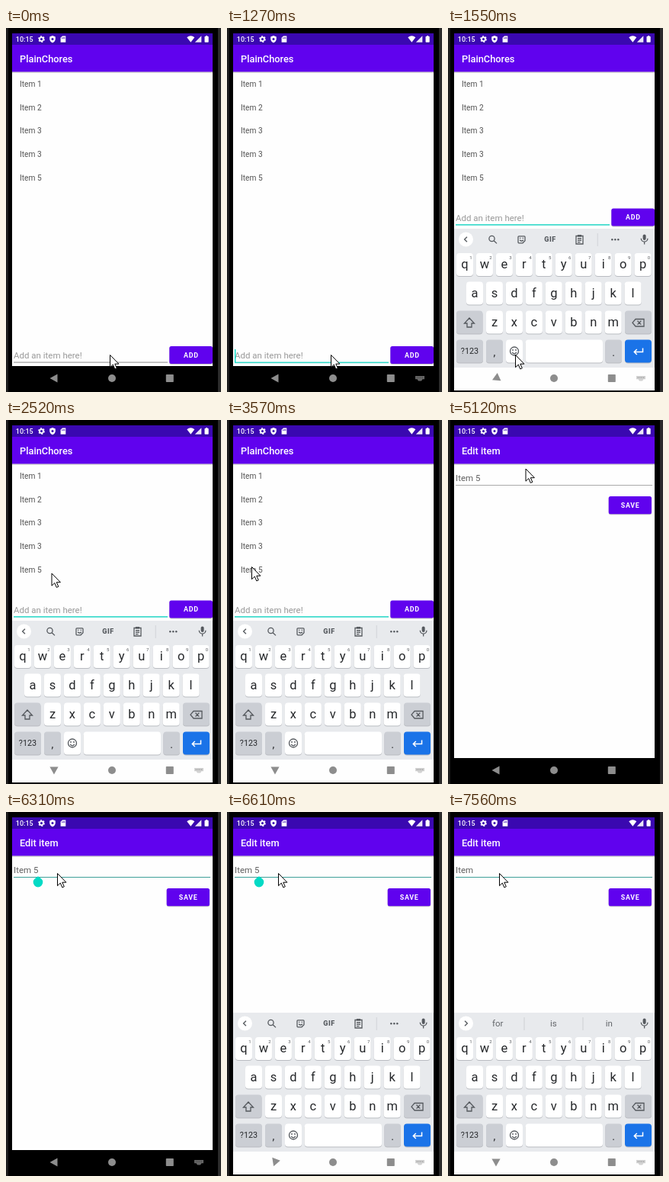
Write an HTML page that moves like this. It is 282 by 477 pixels and loops after 8000 ms.

```html
<!DOCTYPE html>
<html lang="en">
<head>
<meta charset="utf-8">
<title>To-do app</title>
<style>
html, body { margin: 0; width: 100%; height: 100%; overflow: hidden; background: #000; }
svg { display: block; width: 282px; height: 477px; font-family: Roboto, "Open Sans", sans-serif; }
.title { font-size: 12.8px; font-weight: 500; fill: #fff; }
.btn { font-size: 8.9px; font-weight: 700; letter-spacing: .75px; fill: #fff; text-anchor: middle; }
.field { font-size: 11.5px; }
.key { font-size: 16.5px; fill: #26282b; text-anchor: middle; }
.sup { font-size: 6px; fill: #55585c; text-anchor: middle; }
.sug { font-size: 11.5px; fill: #63666a; text-anchor: middle; }
.ico { fill: none; stroke: #55595e; stroke-width: 1.3; }
</style>
</head>
<body>
<svg id="stage" viewBox="0 0 282 477"></svg>
<script>
const LOOP = 8000;
const PURPLE = '#6002ee', DARK = '#3a08b0', TEAL = '#03dac5', GREY = '#cbced4';

const rect = (x, y, w, h, fill, more = '') =>
  `<rect x="${x}" y="${y}" width="${w}" height="${h}" fill="${fill}" ${more}/>`;
const text = (x, y, cls, s, more = '') =>
  `<text x="${x}" y="${y}" class="${cls}" xml:space="preserve" ${more}>${s}</text>`;
const path = (d, more = '') => `<path d="${d}" ${more}/>`;
const disc = (x, y, r, more = '') => `<circle cx="${x}" cy="${y}" r="${r}" ${more}/>`;

const page = title =>
  rect(8, 7, 263, 468, '#000') + rect(8, 7, 263, 15, DARK) +
  rect(8, 57, 263, 386, '#fefefe') + rect(8, 57, 263, 1.8, '#000', 'opacity=".18"') +
  rect(8, 22, 263, 35.4, PURPLE) + text(18, 45, 'title', title);

const button = (x, y, w, h, label) =>
  rect(x, y + 1, w, h, '#000', 'rx="2.5" opacity=".22"') +
  rect(x, y, w, h, PURPLE, 'rx="2.5"') +
  text(x + w / 2 + .3, y + h / 2 + 3.3, 'btn', label);

function listPage() {
  const items = [1, 2, 3, 3, 5].map((n, i) =>
    text(18, 76.8 + i * 30.8, '', 'Item ' + n, 'font-size="10.2" fill="#555"')).join('');
  return page('PlainChores') + items + `<g id="entry">
    ${text(10, 433.1, 'field', 'Add an item here!', 'fill="#999"')}
    ${rect(10, 437.6, 202, 1, '#8b8b8b', 'id="line"')}
    ${rect(10, 421, 1.4, 17, TEAL, 'id="caret"')}
    ${button(214.3, 417, 56.7, 23, 'ADD')}</g>`;
}

function editPage() {
  return page('Edit item') +
    text(10, 80, 'field', '', 'id="value" fill="#606060"') +
    rect(10, 85, 258, 1, '#aaa', 'id="line2"') +
    rect(0, 67, 1.4, 16, TEAL, 'id="caret2"') +
    path('M42 84.3 L46.4 87.6 A6.3 6.3 0 1 1 37.6 87.6 Z', `id="handle" fill="${TEAL}"`) +
    button(210.7, 100, 56.3, 23.3, 'SAVE');
}

function keyboard() {
  const key = (x, y, w, fill = '#fff') =>
    rect(x, y + 1, w, 30, '#b9bcc1', 'rx="4"') + rect(x, y, w, 30, fill, 'rx="4"');
  const row = (letters, x, y) => [...letters].map((c, i) =>
    key(x - 11 + i * 25.95, y, 22) + text(x + i * 25.95, y + 20, 'key', c)).join('');
  let s = rect(8, 263, 263, 182, '#e8eaed') + rect(8, 445, 263, 40, '#fefefe');

  s += disc(23.5, 277, 9.5, 'fill="#fff"') + path('', 'id="chev" class="ico"');
  s += `<g id="tools">` +
    disc(57.5, 276, 3.6, 'class="ico"') + path('M60.2 278.7 L64 282.4', 'class="ico"') +
    path('M93 272.8 H100 Q101 272.8 101 273.8 V278.8 L98 281.8 H93 Q92 281.8 92 280.8 V273.8 Q92 272.8 93 272.8 Z M94.2 277.8 Q96.5 280.4 98.8 277.8 M94.7 274.8 V276 M98.3 274.8 V276', 'class="ico"') +
    text(134, 280.3, '', 'GIF', 'font-size="9" font-weight="900" letter-spacing=".5" fill="#55595e" text-anchor="middle"') +
    path('M168 272.5 H177 V283 H168 Z M170 276 H175 M170 278.3 H175 M170 280.6 H173.5', 'class="ico"') +
    rect(170, 271, 5, 2.6, '#55595e') + rect(195.7, 269, 1, 17, '#d0d3d7') +
    [215.3, 219.3, 223.3].map(x => disc(x, 277.3, 1.2, 'fill="#55595e"')).join('') + '</g>';
  s += `<g id="words">` + ['for', 'is', 'in'].map((w, i) =>
    text(65.3 + i * 73, 281.3, 'sug', w)).join('') +
    rect(99.5, 269, 1, 17, '#cdd0d4') + rect(176.5, 269, 1, 17, '#cdd0d4') + '</g>';
  s += rect(255.6, 270.5, 4, 7.6, '#55595e', 'rx="2"') +
    path('M253.3 275.8 A4.3 4.3 0 0 0 261.9 275.8 M257.6 280 V283.5', 'class="ico"');

  s += row('qwertyuiop', 22, 295);
  for (let i = 0; i < 10; i++) s += text(30 + i * 25.95, 302.5, 'sup', (i + 1) % 10);
  s += row('asdfghjkl', 35, 332.6) + row('zxcvbnm', 61, 370.6);
  s += key(11, 370.6, 34.5, GREY) + key(232, 370.6, 35, GREY);
  s += path('M28 380 L34.5 387 H31 V392 H25 V387 H21.5 Z', 'class="ico"');
  s += path('M246 381.5 H257 V391 H246 L242 386.2 Z M248.5 383.8 L253.3 388.6 M253.3 383.8 L248.5 388.6', 'class="ico"');
  s += key(11, 408.6, 35, GREY) + key(50, 408.6, 22, GREY) + key(76, 408.6, 22) +
    key(101.7, 408.6, 101.3) + key(206.3, 408.6, 21.7, GREY) + key(232, 408.6, 35, '#1a73e8');
  s += text(28.5, 427.4, 'key', '?123', 'style="font-size:10.8px"') +
    text(61, 430, 'key', ',', 'style="font-size:14px"') +
    text(217, 430, 'key', '.', 'style="font-size:14px"');
  s += disc(87, 423.5, 5.5, 'class="ico"') + path('M84.2 425 Q87 428.6 89.8 425', 'class="ico"') +
    disc(85, 422, .9, 'fill="#55595e"') + disc(89, 422, .9, 'fill="#55595e"');
  s += path('M255.5 419.5 V424.5 H244.5 M247.8 421 L244.3 424.5 L247.8 428', 'fill="none" stroke="#fff" stroke-width="1.5"');
  return s;
}

function statusIcons() {
  return `<g fill="#fff">` +
    text(12.8, 17.9, '', '10:15', 'font-size="9" font-weight="500"') +
    disc(46.5, 14.6, 2.5, 'fill="none" stroke="#fff" stroke-width="1.8"') +
    disc(46.5, 14.6, 3.8, 'fill="none" stroke="#fff" stroke-width="1.2" stroke-dasharray="2 1.98"') +
    path('M61 10 L64.8 11.5 V14.5 Q64.5 18 61 19.4 Q57.5 18 57.2 14.5 V11.5 Z') +
    disc(61, 14.4, 1.5, `fill="${DARK}"`) +
    path('M74 10.4 H78.3 V18.8 H71.6 V12.8 Z') +
    path('M73.6 12.5 V14.2 M75.2 12 V14.2 M76.8 12 V14.2', `stroke="${DARK}" stroke-width=".8"`) +
    path('M237.3 12.3 Q242.3 8.4 247.3 12.3 L242.3 18.8 Z') +
    path('M256.3 10.2 V18.7 H247.8 Z', 'opacity=".9"') +
    rect(260.5, 11, 5.2, 7.8, '#fff', 'rx=".7"') + rect(262, 10, 2.2, 1.5, '#fff') + '</g>';
}

function navIcons() {
  let dots = '';
  for (let c = 0; c < 4; c++) dots += rect(248.8 + c * 2.4, 457.6, 1.1, 1, '#000', 'opacity=".4"');
  return `<g fill="#8d8d8d">` +
    path('M-5.5 0 L4.5 -5.6 V5.6 Z', 'id="back"') + disc(139, 459, 5) +
    rect(209.8, 454, 10, 10, '#8d8d8d', 'rx=".8"') + '</g>' +
    `<g id="ime">` + path('M247 456 H259 V460.3 H256.5 L255 462.6 H251 L249.5 460.3 H247 Z') + dots + '</g>';
}

const stage = document.getElementById('stage');
stage.innerHTML =
  `<clipPath id="screen"><rect x="8" y="7" width="263" height="468"/></clipPath>` +
  rect(0, 0, 282, 477, '#000') + rect(0, 0, 3, 477, '#1d1d1d') + rect(278, 0, 4, 477, '#2c2c2c') +
  `<g clip-path="url(#screen)"><g id="list">${listPage()}</g><g id="edit">${editPage()}</g>
   <g id="kb">${keyboard()}</g>${statusIcons()}${navIcons()}</g>` +
  path('M0 0 V16.2 L3.8 12.6 L6.3 18.4 L8.8 17.3 L6.3 11.7 H11.4 Z',
    'id="mouse" fill="#fff" stroke="#000" stroke-width="1" stroke-linejoin="round"');

const $ = {};
stage.querySelectorAll('[id]').forEach(e => $[e.id] = e);
const set = (e, o) => { for (const k in o) e.setAttribute(k, o[k]); };
const show = (e, on) => e.setAttribute('visibility', on ? 'inherit' : 'hidden');

// Each row: start time, then the values held until the next row.
const MOUSE = [
  [0, 136.5, 428.5], [1420, 112, 430], [1550, 88.5, 428.5], [1700, 82.5, 430], [1840, 127.5, 352],
  [1990, 119, 268], [2110, 109, 218], [2370, 77, 208], [2520, 60, 201], [2670, 48, 197],
  [2790, 40, 195], [2920, 35, 193.5], [3040, 32.5, 193], [3320, 32.5, 192.5],
  [4700, 34, 188], [4820, 40, 172], [4970, 101, 69], [5120, 102, 64], [5270, 94, 70],
  [5390, 80, 78], [5510, 73, 82], [6060, 67.5, 80.5]];
const KEYS = [ // slide, opacity, back-arrow angle
  [0, 0, 0, 0], [1420, 8, 1, -8], [1550, 0, 1, -25], [1700, 0, 1, -90],
  [4280, 6, .6, -72], [4400, 0, 0, -25], [4550, 0, 0, -4], [4700, 0, 0, 0],
  [6460, 8, 1, -12], [6610, 0, 1, -70], [6890, 0, 1, -90]];
const OPEN = [ // list scale, edit scale, edit opacity
  [0, 1, .85, 0], [4280, 1.01, .89, .35], [4400, 1.041, .982, 1],
  [4550, 1.047, .992, 1], [4700, 1.05, .997, 1], [4820, 1.05, 1, 1]];
const held = (rows, t) => rows.filter(r => r[0] <= t).pop().slice(1);
const during = (t, ...spans) => spans.some(([a, b]) => t >= a && t < b);
const zoom = k => `translate(139.5 241) scale(${k}) translate(-139.5 -241)`;

function draw(t) {
  const [mx, my] = held(MOUSE, t);
  set($.mouse, { transform: `translate(${mx} ${my})` });

  const [slide, alpha, angle] = held(KEYS, t);
  show($.kb, alpha > 0);
  set($.kb, { transform: `translate(0 ${slide})`, opacity: alpha });
  set($.back, { transform: `translate(63 459) rotate(${angle})` });
  show($.ime, during(t, [1270, 4280], [6310, LOOP]));
  set($.ime, { fill: alpha ? '#d2d2d2' : '#666' });

  const [listK, editK, editA] = held(OPEN, t);
  set($.list, { transform: zoom(listK) });
  set($.edit, { transform: zoom(editK), opacity: editA });
  show($.edit, editA > 0);

  const focus = t >= 990;
  set($.entry, { transform: `translate(0 ${during(t, [1420, 4280]) ? -180.5 : 0})` });
  set($.line, { fill: focus ? '#2fd9c9' : '#8b8b8b', height: focus ? 1.6 : 1 });
  show($.caret, during(t, [990, 1420], [2110, 2520], [3040, 3570]));

  const cut = t >= 7040;
  $.value.textContent = cut ? 'Item ' : 'Item 5';
  set($.line2, { fill: t >= 5660 ? '#3f9f99' : '#aaa' });
  set($.caret2, { x: cut ? 35.4 : 41.6 });
  show($.caret2, during(t, [5660, 6190], [7040, 7560]));
  show($.handle, during(t, [6060, 7040]));

  const words = t >= 7160;
  show($.words, words);
  show($.tools, !words);
  set($.chev, { d: words ? 'M22 273.7 L25.4 277 L22 280.3' : 'M25 273.7 L21.6 277 L25 280.3' });
}

const start = performance.now();
function tick() {
  draw((performance.now() - start) % LOOP);
  requestAnimationFrame(tick);
}
tick();
</script>
</body>
</html>
```
